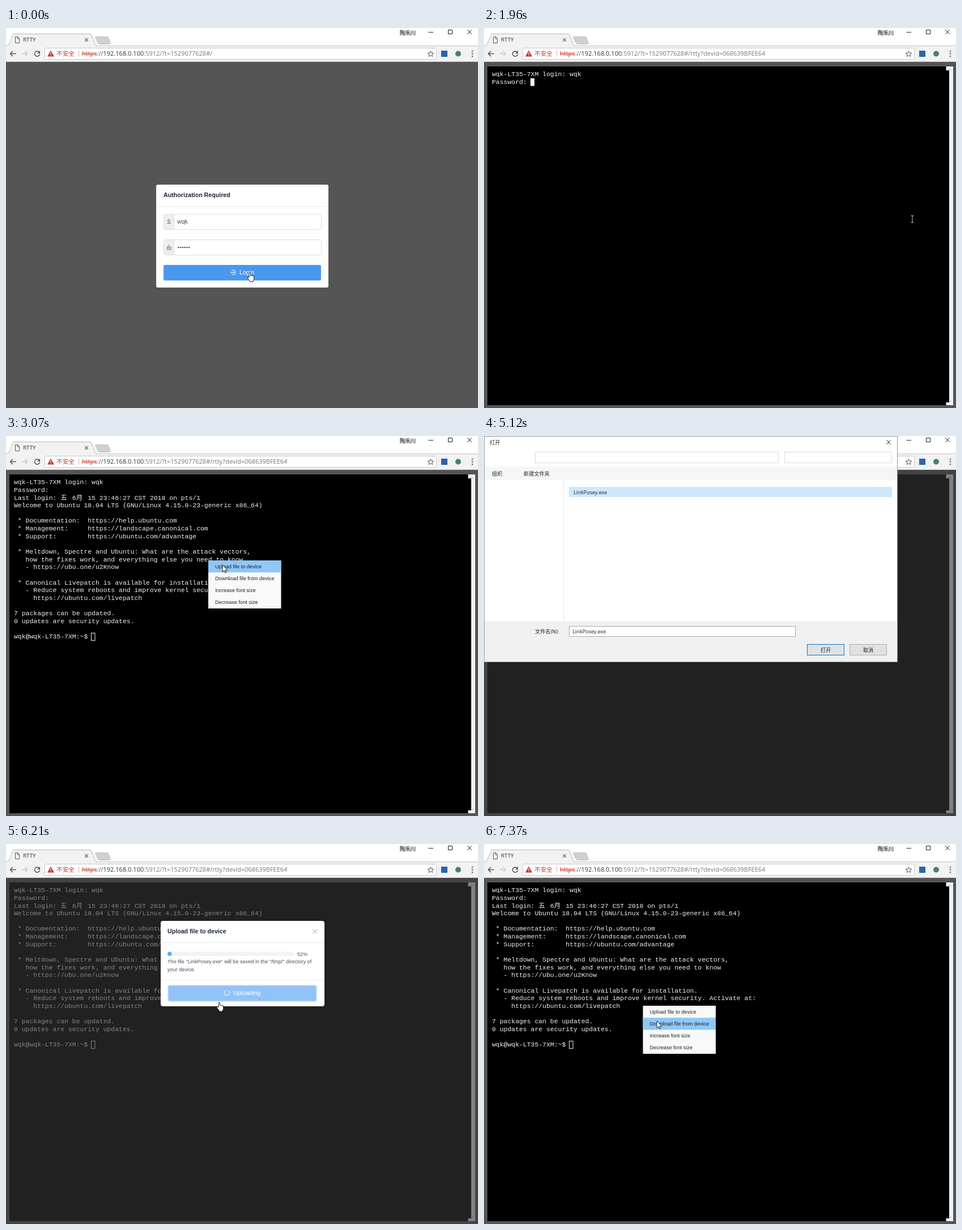
Recreate the animation shown at these times as an HTML page. Size 833 by 672 pixels, loop 8000 ms.

```html
<!DOCTYPE html>
<html lang="zh">
<head>
<meta charset="utf-8">
<title>RTTY</title>
<style>
  html, body { margin: 0; width: 100%; height: 100%; overflow: hidden; background: #fff; }
  svg { display: block; }
  text { white-space: pre; font-family: "Liberation Sans", Arial, sans-serif; }
  .mono { font-family: "Liberation Mono", monospace; }
  .ui { font-family: "Open Sans", "Noto Sans CJK SC", "Noto Sans CJK", sans-serif; }
  .cjk { font-family: "Noto Sans CJK SC", "Noto Sans CJK", sans-serif; }
  .bold { font-weight: bold; }
</style>
</head>
<body>
<svg id="stage" width="833" height="672" viewBox="0 0 833 672"></svg>
<script>
const SMALL = 9.15, MEDIUM = 10.67, BLUE = '#2d8cf0', INK = '#495060', DARK = '#1c2438';
const USER = 'wqk', HOST = USER + '-LT35-7XM', FILE = 'LinkPosey.exe';

const rect = (x, y, w, h, fill, more = '') =>
  `<rect x="${x}" y="${y}" width="${w}" height="${h}" fill="${fill}" ${more}/>`;
const box = (x, y, w, h, fill, stroke, rx = 3) =>
  rect(x + .5, y + .5, w - 1, h - 1, fill, `stroke="${stroke}" rx="${rx}"`);
const text = (x, y, s, size = SMALL, fill = INK, more = '') =>
  `<text x="${x}" y="${y}" font-size="${size}" fill="${fill}" ${more}>${s}</text>`;
const line = (d, stroke, width = 1, more = '') =>
  `<path d="${d}" fill="none" stroke="${stroke}" stroke-width="${width}" ${more}/>`;
const shape = (d, fill, more = '') => `<path d="${d}" fill="${fill}" ${more}/>`;
const circle = (x, y, r, fill, more = '') =>
  `<circle cx="${x}" cy="${y}" r="${r}" fill="${fill}" ${more}/>`;
const cross = (x, y, r, color, width = 1) =>
  line(`M${x - r} ${y - r}l${2 * r} ${2 * r}m0 ${-2 * r}l${-2 * r} ${2 * r}`, color, width);
const centered = 'text-anchor="middle"';

// Pointers
const pointer = (x, y, d) =>
  shape(d, '#fff', `stroke="#111" stroke-width=".9" stroke-linejoin="round" transform="translate(${x} ${y})"`);
const hand = (x, y) => pointer(x, y, 'M4 9.4V1.6a1.2 1.2 0 0 1 2.4 0V6a1.1 1.1 0 0 1 2.1.3 1.1 1.1 0 0 1 2.1.5 1 1 0 0 1 2 .6V11.5q0 2-1.4 3.5v1.6H5.2V15Q2.5 12 1 9.8.4 8 2 8q1 0 2 1.4Z');
const arrow = (x, y) => pointer(x, y, 'M0 0V12.5L3 9.8 4.9 14.2 6.8 13.4 4.9 9.2H8.8Z');
const beam = (x, y) => line(`M${x - 2.5} ${y - 6}h5m-2.5 0v12m-2.5 0h5`, '#ccc');

function browser(path) {
  const url = `<tspan fill="#c5392b">https</tspan><tspan fill="#555">://</tspan>` +
    `<tspan fill="#333">192.168.0.100</tspan>:5912/?t=1529077628#/${path}`;
  return rect(0, 0, 833, 60, '#fff') +
    rect(0, 31, 833, 29, '#f2f2f2') +
    line('M0 31.5H833', '#c4c4c4') +
    shape('M3 32Q5 31 6 28L12 13Q13 10.500 15 10.500H148Q150 10.500 151 13L157 28Q158 31 160 32Z', '#f2f2f2') +
    line('M3 31.500Q5 31 6 28L12 13Q13 10.500 15 10.500H148Q150 10.500 151 13L157 28Q158 31 160 31.500', '#b4b4b4') +
    shape('M159 15.500H178Q180 15.500 181 18L184 26Q184 28.500 182 28.500H166Q163 28.500 162 26L158 17Q157 15.500 159 15.500Z', '#d0d0d0', 'stroke="#bcbcbc"') +
    line('M16.500 15.500H21L23.500 18.500V26.500H16.500ZM20.500 15.500V19H23.500', '#555') +
    text(30, 24, 'RTTY', 9.8, '#333', 'class="ui"') +
    cross(142, 21, 2.8, '#555', 1.2) +
    text(695, 11.500, '陶禾川', 9.4, '#444', 'class="cjk" stroke="#bbb" stroke-width="1.2" paint-order="stroke"') +
    line('M745.500 7.500H754M780.500 3.500H787.500V10.500H780.500Z', '#222') + cross(818, 7, 3.8, '#222') +
    line('M17.500 45.500H7.500M12 41L7.500 45.500L12 50', '#555', 1.5) +
    line('M28 45.500H38M33.500 41L38 45.500L33.500 50', '#ccc', 1.5) +
    line('M58.500 42.500A4.600 4.600 0 1 0 59.500 46.500', '#555', 1.5) + shape('M60 40V45H55Z', '#555') +
    box(68, 35, 692, 21, '#fff', '#c8c8c8', 2) +
    shape('M79 39.500L85 50.500H73Z', '#c5392b') + rect(78.4, 43, 1.2, 4, '#fff') + rect(78.4, 48, 1.2, 1.2, '#fff') +
    text(89, 49, '不安全', MEDIUM, '#c5392b', 'class="cjk"') +
    line('M128.500 40V51', '#bbb') +
    text(134, 49, url, 11, '#777', 'class="ui"') + line('M134 46H160', '#c5392b') +
    line('M749.500 40.500L751 44.200L754.800 44.400L751.900 46.800L752.800 50.500L749.500 48.400L746.200 50.500L747.100 46.800L744.200 44.400L748 44.200Z', '#555') +
    rect(768, 40, 11, 11, '#2f63a8') + circle(798, 45.5, 5, '#4a7f70') +
    [41, 45.5, 50].map(y => circle(823, y, 1.2, '#555')).join('') +
    line('M0 59.500H833', '#c9c9c9');
}
const page = rect(0, 60, 833, 612, '#555');
const consolePath = 'rtty?devid=068639BFEE64';

function login() {
  const field = y => box(278, y, 279, 28, '#fff', '#dddee1') +
    rect(279, y + 1, 17, 26, '#eee') + line(`M296.500 ${y}v28`, '#dddee1');
  return browser('') + page +
    rect(265, 277, 304, 182, '#fff', 'rx="3"') +
    text(278, 299, 'Authorization Required', MEDIUM, DARK, 'class="bold"') +
    line('M265 315.500H569', '#e9eaec') +
    field(329) + circle(287.5, 340.5, 1.9, 'none', `stroke="${INK}" stroke-width=".8"`) +
    line('M284 345.500H291M286 344Q287.500 342 289 344', INK, .8) +
    text(302, 346, USER, MEDIUM) +
    field(374) + line('M284.500 387.500H291V392H284.500ZM286 387V385.500Q287.500 382.500 289.300 385M286 389.700H289.500', INK, .8) +
    [0, 1, 2, 3, 4, 5].map(i => circle(304.5 + i * 3.74, 388, 1.35, INK)).join('') +
    rect(278, 419, 278, 27.5, '#4998ee', 'rx="3"') +
    line('M398 429.500A4.300 4.300 0 1 1 398 435M396 432.300H403M401 430L403.300 432.300L401 434.600', '#fff') +
    text(412, 436, 'Login', MEDIUM, '#fff') + hand(425, 432);
}

const devices = `0164F4CEA27E fe77f011381dc2574a89
030F02DAA256 13cc109b4b8c1f2e7f8b
047B84E61025 907fe2b33f712754e62b
04C5FE3E86A4 c02bdf48ee2e0245162f
065906EBA900 b284766cb995ea2270ae
068639BFEE64 9e8db5dc0f4d9692dada
074D82A98522 c6ffa0b6d75f6187ec74
0C18040DAFC5 3b82e23d08f3fcd90926
0E326AC7AA67 568f9c7a142c3310ec45
0F64AC1D79EA e9b7dff0d6d9a1035e61
1339EC3C39AA e41e326120cc6a50059d
149164A08A23 19ec170d4f366176ad4e
1AB5E6CEF219 a4956e84c070e59329c8
1BDFBBD9F67F 65af7cc6b4bb88484e02
1E6D98B67C14 ee73e4f3806b6351dcd4`.split('\n').map(row => row.split(' '));

function deviceList() {
  const heading = (x, s) => text(x, 121.5, s, SMALL, INK, 'class="bold"');
  const sorter = (x, up) => shape(`M${x - 3} 117l3 -3.500l3 3.500Z`, up) + shape(`M${x - 3} 119l3 3.500l3 -3.500Z`, '#bbbec4');
  const rows = devices.map(([id, description], i) => {
    const y = 151 + i * 36.43, active = i === 5;
    return (active ? rect(6, y - 18, 810, 36.4, '#ebf7ff') : '') +
      line(`M6 ${Math.round(y + 18) + .5}H816`, '#e9eaec') +
      text(20.5, y + 3.2, id) + text(252.5, y + 3.2, '0h 57m 6s') + text(483.5, y + 3.2, description) +
      rect(729.5, y - 12, 58, 24, active ? '#4292e6' : BLUE, 'rx="3"') +
      text(758.5, y + 3.2, 'Connect', SMALL, '#fff', centered);
  }).join('');
  return browser(consolePath) + page +
    rect(6, 68, 304, 27, '#fff', 'rx="3"') +
    text(12, 85, 'Please enter the filter key...', MEDIUM, '#bbbec4') +
    circle(297, 80.8, 3.4, 'none', 'stroke="#666" stroke-width="1.300"') + line('M299.500 83.300L302.500 86.300', '#666', 1.5) +
    text(680.5, 89.5, 'Online Device: 129', 12.2, BLUE) +
    rect(6, 103, 810, 569, '#fff') + rect(6, 103, 810, 30, '#f8f8f9') + line('M6 133.500H816', '#e9eaec') +
    heading(20.5, 'ID') + sorter(38, BLUE) + heading(252.5, 'Uptime') + sorter(291.5, '#bbbec4') +
    heading(483.5, 'Description') + heading(756, '#') + rows +
    rect(824, 60, 9, 612, '#f1f1f1') + rect(825, 72, 8, 77, '#c1c1c1') +
    shape('M826 68l3 -3l3 3Z', '#888') + shape('M826 665l3 3l3 -3Z', '#555') +
    hand(750, 338);
}

// Terminal
const CELL = 6.858, ROW = 13.65;
const rowTop = row => 75.2 + row * ROW;
const termText = (row, s, col = 0, cls = 'mono') =>
  text(14 + col * CELL, rowTop(row) + 10, s, 11.43, '#f2f2f2', `class="${cls}"`);

const banner = `Last login:        15 23:46:27 CST 2018 on pts/1
Welcome to Ubuntu 18.04 LTS (GNU/Linux 4.15.0-23-generic x86_64)

 * Documentation:  https://help.ubuntu.com
 * Management:     https://landscape.canonical.com
 * Support:        https://ubuntu.com/advantage

 * Meltdown, Spectre and Ubuntu: What are the attack vectors,
   how the fixes work, and everything else you need to know
   - https://ubu.one/u2Know

 * Canonical Livepatch is available for installation.
   - Reduce system reboots and improve kernel security. Activate at:
     https://ubuntu.com/livepatch

7 packages can be updated.
0 updates are security updates.

${USER}@${HOST}:~$ `.split('\n');

const terminal = content => browser(consolePath) + page +
  rect(6, 68, 815, 599, '#000') + rect(821, 68, 7, 599, '#f1f1f1') +
  rect(815.5, 68, 12, 7, '#f1f1f1') + rect(815.5, 662, 12, 5, '#f1f1f1') +
  line('M820 75l2 -2l2 2M820 659l2 2l2 -2', '#999') +
  termText(0, `${HOST} login: ${USER}`) + termText(1, 'Password:') + content;

const passwordPrompt = () => terminal(rect(82, 89, 7, 13.5, '#fff') + beam(756, 338));
const session = () => terminal(banner.map((s, i) => termText(i + 2, s)).join('') +
  termText(2, '五', 12, 'cjk') + termText(2, '6', 15) + termText(2, '月', 16, 'cjk') +
  rect(150.5, 348.5, 6.5, 13, 'none', 'stroke="#f2f2f2"'));

function menu(x, y, active) {
  const items = ['Upload file to device', 'Download file from device', 'Increase font size', 'Decrease font size'];
  return rect(x, y, 128.5, 85, '#f9f9f9') + items.map((s, i) =>
    (i === active ? rect(x, y + i * 21.25, 128.5, 21.25, '#8fc7f8') : '') +
    text(x + 12, y + 13.5 + i * 21.25, s, SMALL, '#222')).join('');
}

const mask = opacity => rect(0, 60, 833, 612, '#373737', `opacity="${opacity}"`);
const modal = (height, divider, content) => session() + mask(.6) +
  rect(273, 136, 289, height, '#fff', 'rx="4"') +
  text(285, 158, 'Upload file to device', MEDIUM, DARK, 'class="bold"') +
  cross(545, 154.5, 4, '#999') +
  line(`M273 174.500H562M273 ${divider}H562`, '#e9eaec') + content;

const chooseFile = () => modal(140, 229.5,
  box(285, 187, 125, 24, '#fff', BLUE) + text(302.5, 202, 'Select the file to upload', SMALL, BLUE) +
  rect(286, 239, 262, 27.5, BLUE, 'rx="3"') +
  text(417, 256, 'Click to upload', MEDIUM, '#fff', centered));

const uploading = () => modal(151, 240.5,
  rect(285, 190.5, 223, 7.5, '#f3f3f3', 'rx="3.700"') + rect(285, 190.5, 7.5, 7.5, '#5cadf0', 'rx="3.700"') +
  text(514, 197.5, '52%') +
  text(285, 211, `The file "${FILE}" will be saved in the "/tmp/" directory of`) +
  text(285, 224.5, 'your device.') +
  rect(285, 249, 264, 30, '#d5e8fc', 'rx="4"') + rect(286.5, 250.5, 261, 27, '#91c3f8', 'rx="3"') +
  line('M388 258.700A4.800 4.800 0 1 0 392 258.700', '#fff') +
  text(401, 267, 'Uploading', MEDIUM, '#fff') + hand(371, 279.5));

function fileDialog() {
  const label = (x, y, s) => text(x, y, s, SMALL, '#222', 'class="ui"');
  const button = (x, s, stroke) => box(x, 368, 66, 20, '#e1e1e1', stroke, 0) +
    text(x + 33, 381.5, s, SMALL, '#222', `class="ui" ${centered}`);
  return box(0, 0, 730, 400, '#fff', '#999', 0) +
    label(10, 15, '打开') + cross(714, 11, 3.8, '#222') +
    box(90, 28, 430, 20, '#fff', '#d9d9d9', 0) + box(530, 28, 190, 20, '#fff', '#d9d9d9', 0) +
    rect(1, 54, 728, 24, '#f5f6f7') + label(14, 70, '组织') + label(70, 70, '新建文件夹') +
    line('M140.500 78V328', '#e5e5e5') +
    rect(150, 90, 570, 18, '#cce8ff') + label(158, 102.5, FILE) +
    rect(1, 328, 728, 71, '#f0f0f0') + label(90, 349, '文件名(N):') +
    box(150, 336, 400, 19, '#fff', '#aaa', 0) + label(156, 349, FILE) +
    button(570, '打开', '#0078d7') + button(645, '取消', '#adadad');
}

const scenes = [
  [0, login()],
  [880, deviceList()],
  [1960, passwordPrompt()],
  [3070, session() + menu(357, 220, 0) + arrow(382, 228)],
  [3990, chooseFile() + arrow(380, 204.5)],
  [5120, chooseFile() + fileDialog()],
  [6210, uploading()],
  [7300, session() + mask(.3)],
  [7370, session() + menu(280.5, 286, 1) + arrow(305, 313)]
];
const stage = document.getElementById('stage');
let shown;
function draw(now) {
  const time = now % 8000;
  const scene = scenes.findLast(([start]) => start <= time);
  if (scene !== shown) stage.innerHTML = (shown = scene)[1];
  requestAnimationFrame(draw);
}
draw(performance.now());
</script>
</body>
</html>
```
